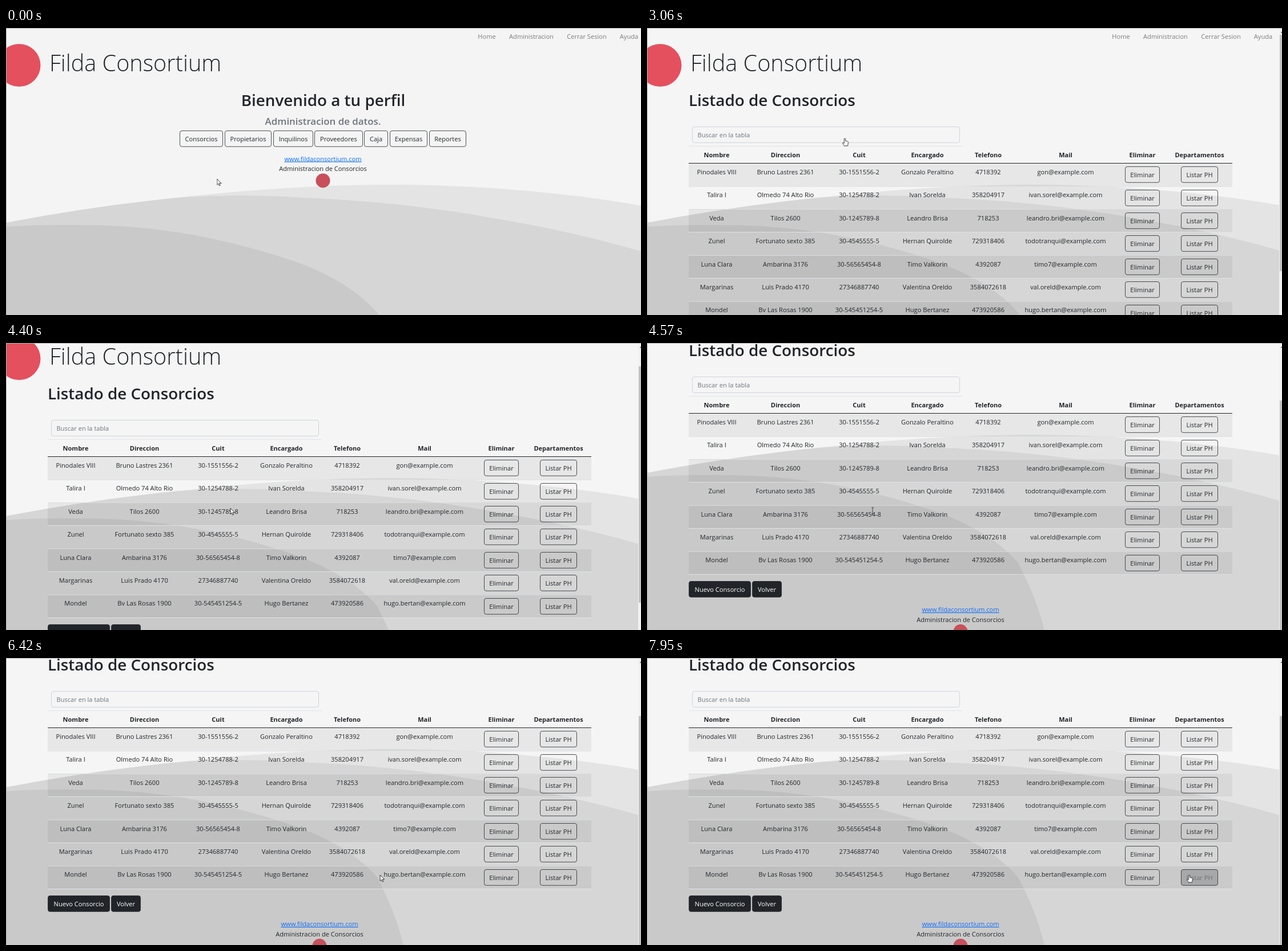
An HTML page for the animation above (8000 ms loop, 1112 by 504 pixels).

```html
<!DOCTYPE html>
<html lang="es">
<head>
<meta charset="utf-8">
<title>Consorcios</title>
<style>
html, body { margin: 0; width: 100%; height: 100%; overflow: hidden; background: #f4f4f4; }
svg { display: block; width: 1112px; height: 504px; }
text { font: 11.1px "Open Sans", "Noto Sans", sans-serif; fill: #212529; text-anchor: middle; white-space: pre; }
.start { text-anchor: start; }
.brand { font-size: 39.6px; font-weight: 300; }
.h1 { font-size: 27.8px; font-weight: 600; }
.h2 { font-size: 16.9px; font-weight: 600; fill: #6c757d; }
.th { font-size: 11px; font-weight: 700; }
.nav { fill: #7c7c7c; }
.hint { fill: #6c757d; }
.link { fill: #0d6efd; text-decoration: underline; }
.btn rect { fill: transparent; stroke: #212529; stroke-opacity: .78; }
.dark rect { fill: #212529; }
.dark text { fill: #fff; }

#home, #list, #scroll, #thumb, #arrow, #hand, #beam { animation: 8s step-end infinite; }
#home { animation-name: home; }
#list { animation-name: list; }
#scroll { animation-name: scroll; }
#thumb { animation-name: thumb; }
#arrow { animation-name: arrow; }
#hand { animation-name: hand; }
#beam { animation-name: beam; }
#cursor { animation: move 8s linear infinite; }
#ring { animation: ring 8s linear infinite; }
.hover1 rect { animation: fill1 8s linear infinite; }
.hover1 text { animation: ink1 8s linear infinite; }
.hover2 rect { animation: fill2 8s linear infinite; }
.hover2 text { animation: ink2 8s linear infinite; }

@keyframes home { 0% { visibility: visible } 38.2%, 100% { visibility: hidden } }
@keyframes list { 0% { visibility: hidden } 38.2%, 100% { visibility: visible } }
@keyframes scroll {
  0% { transform: translateY(0) }
  54.2% { transform: translateY(-8px) }
  54.95% { transform: translateY(-38px) }
  56.1% { transform: translateY(-88px) }
  57.08% { transform: translateY(-114px) }
  58.2%, 100% { transform: translateY(-115px) }
}
@keyframes thumb {
  0% { transform: translateY(0) }
  54.2% { transform: translateY(6px) }
  54.95% { transform: translateY(29px) }
  56.1% { transform: translateY(69px) }
  57.08% { transform: translateY(89px) }
  58.2%, 100% { transform: translateY(90px) }
}
@keyframes move {
  0%, 6.25% { transform: translate(369.5px, 265px) }
  7.75% { transform: translate(367px, 261px) }
  11.25% { transform: translate(367px, 261px); animation-timing-function: ease-in-out }
  19.5% { transform: translate(346.5px, 200px) }
  21.75% { transform: translate(346.5px, 197.5px) }
  25.9% { transform: translate(346.5px, 193.5px) }
  46.4% { transform: translate(346.5px, 193.5px); animation-timing-function: ease-in-out }
  54% { transform: translate(393px, 290px) }
  55% { transform: translate(393px, 290px) }
  56.1% { transform: translate(395px, 294.5px) }
  60.6% { transform: translate(395px, 294.5px); animation-timing-function: ease-in }
  65.6% { transform: translate(210px, 345px) }
  68.1% { transform: translate(98px, 372px) }
  70.25% { transform: translate(158px, 377px) }
  71% { transform: translate(160px, 378px) }
  80.25% { transform: translate(655px, 381px) }
  81.25% { transform: translate(667px, 382.5px) }
  89.4%, 91.25% { transform: translate(793.5px, 382.5px); animation-timing-function: ease-in-out }
  98.6% { transform: translate(946px, 383px) }
  99.3%, 100% { transform: translate(949.5px, 380.5px) }
}
@keyframes hand {
  0%, 46.4% { opacity: 0 }
  16.9%, 98.1%, 100% { opacity: 1 }
}
@keyframes beam {
  0%, 48.8%, 61.5%, 73.4%, 75.75%, 77.9%, 79.8%, 91.5%, 100% { opacity: 0 }
  46.4%, 56.1%, 71.7%, 74.2%, 76.5%, 78.6%, 81.2% { opacity: 1 }
}
@keyframes arrow {
  0%, 48.8%, 61.5%, 73.4%, 75.75%, 77.9%, 79.8%, 91.5% { opacity: 1 }
  16.9%, 46.4%, 56.1%, 71.7%, 74.2%, 76.5%, 78.6%, 81.2%, 98.1%, 100% { opacity: 0 }
}
@keyframes ring { 0%, 30.4% { opacity: 0 } 32.75%, 100% { opacity: .5 } }
@keyframes fill1 { 0%, 16.9% { fill: rgba(33,37,41,0) } 18.75%, 100% { fill: #212529 } }
@keyframes ink1 { 0%, 16.9% { fill: #212529 } 18.75%, 100% { fill: #fff } }
@keyframes fill2 { 0%, 98.8% { fill: rgba(33,37,41,0) } 100% { fill: rgba(33,37,41,.42) } }
@keyframes ink2 { 0%, 98.8% { fill: #212529 } 100% { fill: #c0c0c0 } }
</style>
</head>
<body>
<svg viewBox="0 0 1112 504">
  <defs>
    <g id="hills">
      <path fill="#e4e4e4" d="M0 342Q150 313 300 298C420 284 560 275 680 275C850 276 1000 292 1112 312V640H0Z"/>
      <path fill="#d6d6d6" d="M0 342Q150 313 300 298C380 293 450 293 520 298C640 303 750 315 860 335C950 350 1040 371 1112 392V640H0Z"/>
      <path fill="#c9c9c9" d="M0 349C60 345 140 345 200 348C330 356 430 385 500 408C570 432 620 465 650 500C665 530 690 580 700 640H0Z"/>
    </g>
  </defs>
  <g id="home"></g>
  <g id="list">
    <rect width="1112" height="504" fill="#f5f5f5"/>
    <g id="scroll"></g>
    <rect x="1107" width="5" height="504" fill="#f1f1f1"/>
    <path d="M1109.5 8.5L1112 6V8.5Z" fill="#505050"/>
    <rect id="thumb" x="1108" y="12" width="4" height="415" fill="#c1c1c1"/>
  </g>
  <path d="M0 .5H1112M.5 0V504" stroke="#adadad" fill="none"/>
  <g id="cursor" stroke-linejoin="round">
    <path id="arrow" d="M0 0V10.5L2.4 8.2 4 12 5.7 11.3 4.1 7.7H7.4Z" fill="#fff" stroke="#222" stroke-width=".9"/>
    <path id="hand" d="M-1.1 1Q0-.6 1.1 1V4.8L5 5.8Q6 6.3 6 8L4.8 13.5H-1L-4 8.6Q-3.4 7-1.1 9Z" fill="#fff" stroke="#222" stroke-width=".9"/>
    <path id="beam" d="M-2-5.5H2M-2 5.5H2M0-5.5V5.5" fill="none" stroke="#444"/>
  </g>
</svg>
<script>
const text = (x, y, s, cls = '') => `<text x="${x}" y="${y}" class="${cls}">${s}</text>`;

const button = (x, y, w, label, cls = '') =>
  `<g class="btn ${cls}"><rect x="${x}" y="${y}" width="${w}" height="27.8" rx="3.5"/>` +
  text(x + w / 2, y + 18.5, label) + '</g>';

const line = (x1, x2, y, color) => `<path d="M${x1} ${y}H${x2}" stroke="${color}"/>`;

const dot = (x, y, r, color) => `<circle cx="${x}" cy="${y}" r="${r}" fill="${color}"/>`;

// Parts shared by both pages; dx shifts the menu beside the scrollbar.
const header = dx => '<use href="#hills"/>' +
  [['Home', 842], ['Administracion', 920], ['Cerrar Sesion', 1017], ['Ayuda', 1091]]
    .map(([s, x]) => text(x - dx, 19, s, 'nav')).join('') +
  dot(23, 65.5, 37.5, '#e4505d') +
  text(76, 76, 'Filda Consortium', 'brand start');

const footer = (x, y) =>
  text(x, y, 'www.fildaconsortium.com', 'link') +
  text(x, y + 17.5, 'Administracion de Consorcios') +
  dot(x, y + 34.5, 12.5, '#c84f5b');

const menu = [
  ['Consorcios', 304.5, 75], ['Propietarios', 383.5, 81], ['Inquilinos', 468.5, 69],
  ['Proveedores', 540.5, 84], ['Caja', 627.5, 41], ['Expensas', 672.5, 65], ['Reportes', 741.5, 64]
];

document.getElementById('home').innerHTML = header(0) +
  text(555.5, 137, 'Bienvenido a tu perfil', 'h1') +
  text(555, 169.5, 'Administracion de datos.', 'h2') +
  '<rect id="ring" x="302.5" y="178.5" width="79" height="31.5" rx="5.5" fill="none" stroke="#212529" stroke-width="3"/>' +
  menu.map(([s, x, w], i) => button(x, 180.5, w, s, i ? '' : 'hover1')).join('') +
  footer(555, 233.5);

const columns = [
  ['Nombre', 122], ['Direccion', 242.5], ['Cuit', 371.5], ['Encargado', 491],
  ['Telefono', 597.5], ['Mail', 733], ['Eliminar', 867.5], ['Departamentos', 967.5]
];
const rows = [
  'Pinodales VIII|Bruno Lastres 2361|30-1551556-2|Gonzalo Peraltino|4718392|gon@example.com',
  'Talira I|Olmedo 74 Alto Rio|30-1254788-2|Ivan Sorelda|358204917|ivan.sorel@example.com',
  'Veda|Tilos 2600|30-1245789-8|Leandro Brisa|718253|leandro.bri@example.com',
  'Zunel|Fortunato sexto 385|30-4545555-5|Hernan Quirolde|729318406|todotranqui@example.com',
  'Luna Clara|Ambarina 3176|30-56565454-8|Timo Valkorin|4392087|timo7@example.com',
  'Margarinas|Luis Prado 4170|27346887740|Valentina Oreldo|3584072618|val.oreld@example.com',
  'Mondel|Bv Las Rosas 1900|30-545451254-5|Hugo Bertanez|473920586|hugo.bertan@example.com'
];

const tableRow = (row, i) => {
  const top = 237.7 + 40.4 * i, y = Math.round(top + 19.3);
  const by = Math.floor(top + 6) + .5;
  const stripe = i % 2 ? '' :
    `<rect x="73" y="${top}" width="952" height="40.4" fill="#000" fill-opacity=".055"/>`;
  return stripe + line(73, 1025, Math.floor(top + 40.4) + .5, '#dee2e6') +
    row.split('|').map((s, c) => text(columns[c][1], y, s)).join('') +
    button(837.5, by, 60, 'Eliminar') +
    button(935.5, by, 64, 'Listar PH', i === 6 ? 'hover2' : '');
};

document.getElementById('scroll').innerHTML = header(12) +
  text(73, 137, 'Listado de Consorcios', 'h1 start') +
  '<rect x="79.5" y="173.5" width="468" height="27.8" rx="3.5" fill="#f5f5f5" stroke="#ced4da"/>' +
  text(88.5, 192, 'Buscar en la tabla', 'hint start') +
  line(73, 553, 207.5, '#e1e4e7') +
  columns.map(([s, x]) => text(x, 227, s, 'th')).join('') +
  rows.map(tableRow).join('') +
  line(73, 1025, 237.5, '#212529') +
  button(73.5, 532.5, 108, 'Nuevo Consorcio', 'dark') +
  button(184.5, 532.5, 51, 'Volver', 'dark') +
  footer(549, 586);
</script>
</body>
</html>
```
